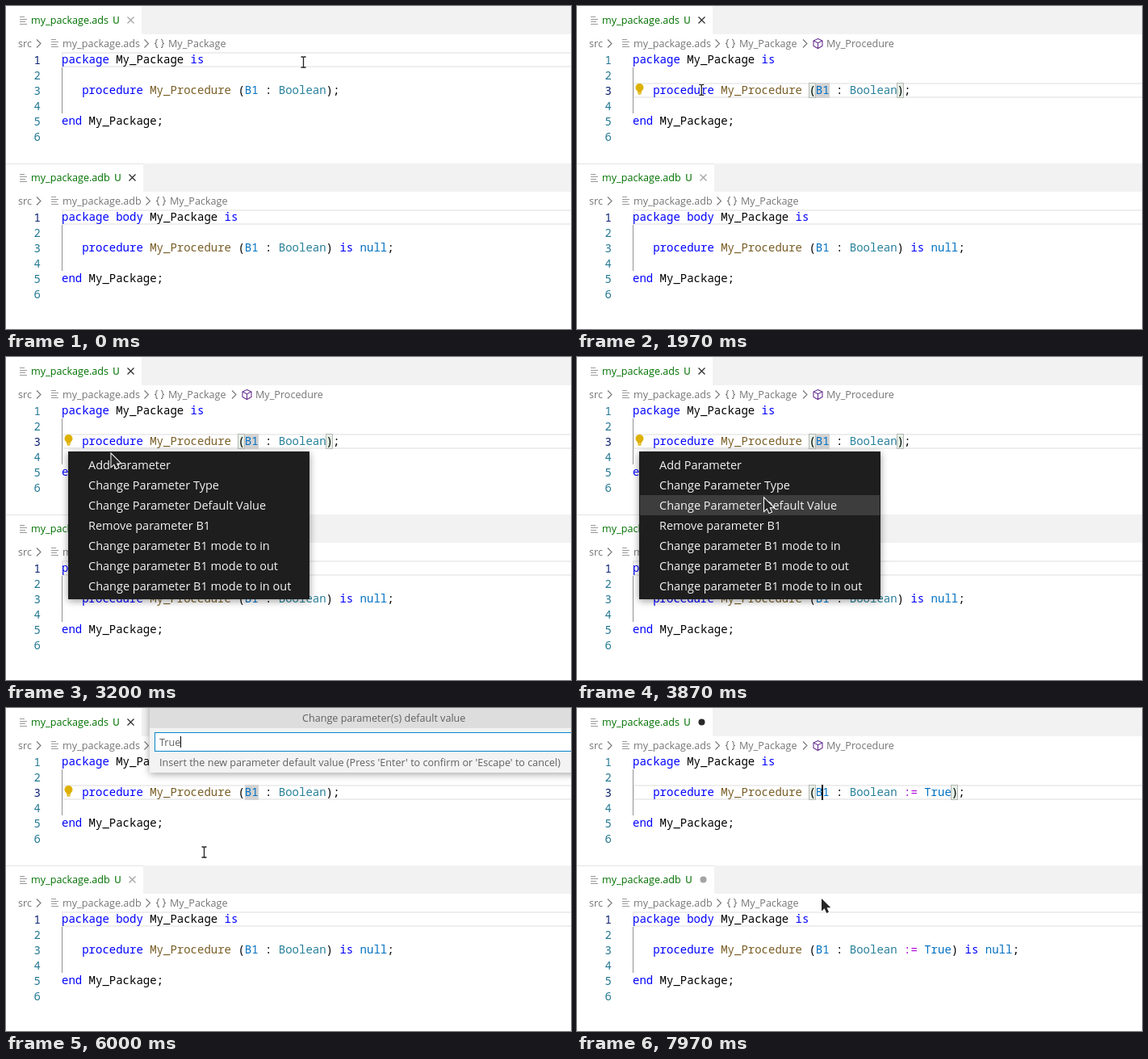
Animation of 700x400 px, one loop 8 s. Source, as an HTML page with a canvas:

```html
<!DOCTYPE html>
<html lang="en">
<head>
<meta charset="utf-8">
<style>
html, body { margin: 0; width: 100%; height: 100%; overflow: hidden; background: #fff; }
canvas { display: block; }
</style>
</head>
<body>
<canvas id="stage" width="700" height="400"></canvas>
<script>
const ctx = document.getElementById('stage').getContext('2d', { alpha: false });
const LOOP = 8000, CHAR = 8.4, ROW = 19, CODE_X = 69;
const UI = '"Open Sans", "Noto Sans", sans-serif';
const MONO = '14px "Noto Sans Mono", "DejaVu Sans Mono", monospace';
const GREY = '#767676', FAINT = '#a3a3a3';

const MENU = { x: 77, y: 117, w: 299, h: 183, top: 121.5, pitch: 25 };
const MENU_ITEMS = ['Add Parameter', 'Change Parameter Type', 'Change Parameter Default Value',
  'Remove parameter B1', 'Change parameter B1 mode to in', 'Change parameter B1 mode to out',
  'Change parameter B1 mode to in out'];

const ease = {
  both: u => u * u * (3 - 2 * u),
  in: u => u * u,
  out: u => u * (2 - u),
  line: u => u
};
// start, end, target x, target y, easing
const MOVES = [
  [400, 930, 304, 104, 'both'],
  [1570, 2230, 76, 103, 'both'],
  [2840, 3200, 130, 120, 'in'],
  [3200, 3630, 231, 175, 'out'],
  [3700, 3730, 232, 175, 'line'],
  [4300, 4470, 245, 178, 'both'],
  [7840, 7970, 303, 236, 'line']
];

function mouseAt(t) {
  let x = 368, y = 69;
  for (const [start, end, toX, toY, kind] of MOVES) {
    if (t < start) break;
    const u = ease[kind](Math.min(1, (t - start) / (end - start)));
    x += (toX - x) * u;
    y += (toY - y) * u;
  }
  return [x, y];
}

function rect(x, y, w, h, color) {
  ctx.fillStyle = color;
  ctx.fillRect(x, y, w, h);
}

function label(str, x, y, color, size = 12.6, weight = 400) {
  ctx.font = `${weight} ${size}px ${UI}`;
  ctx.fillStyle = color;
  ctx.fillText(str, x, y);
}

function path(d, x, y, stroke, width = 1, fill) {
  const p = new Path2D(d);
  ctx.save();
  ctx.translate(x, y);
  if (stroke) {
    ctx.strokeStyle = stroke;
    ctx.lineWidth = width;
    ctx.stroke(p);
  }
  if (fill) {
    ctx.fillStyle = fill;
    ctx.fill(p);
  }
  ctx.restore();
}

function disc(x, y, r, color) {
  ctx.fillStyle = color;
  ctx.beginPath();
  ctx.arc(x, y, r, 0, 7);
  ctx.fill();
}

function shadowed(x, y, w, h, color, alpha) {
  ctx.save();
  ctx.shadowColor = `rgba(0,0,0,${alpha})`;
  ctx.shadowBlur = 9;
  ctx.shadowOffsetY = 2;
  rect(x, y, w, h, color);
  ctx.restore();
}

const fileIcon = (x, y) => path('M0 .5H6M0 3.5H9M0 6.5H7M0 9.5H9', x, y, '#9a9a9a');
const chevron = (x, y) => path('M0 -5L5 0L0 5', x, y, GREY, 1.1);

function tokenColor(word, trueColor) {
  if (/^(package|body|is|procedure|end)$/.test(word)) return '#0000ff';
  if (word === 'My_Procedure') return '#795e26';
  if (word === 'Boolean') return '#267f99';
  if (word === 'True') return trueColor;
  if (/^(B1|null)$/.test(word)) return '#0070c1';
  return word === ':=' ? '#af00db' : '#000';
}

function codeLine(line, y, trueColor) {
  ctx.font = MONO;
  for (const { 0: word, index } of line.matchAll(/\w+|:=|[^\w\s]/g)) {
    ctx.fillStyle = tokenColor(word, trueColor);
    ctx.fillText(word, CODE_X + index * CHAR, y);
  }
}

function editor(top, o) {
  const dx = o.shift;
  // Tab strip
  rect(168 + dx, top, 532, 35, '#f2f2f2');
  fileIcon(17, top + 13);
  label(o.file, 31, top + 22, '#007100', 12.6);
  label('U', 132 + dx, top + 21.5, '#2c8a2c', 12, 600);
  const markColor = o.focused ? '#2a2a2a' : FAINT;
  if (o.dirty) disc(154.5 + dx, top + 17.5, 4, markColor);
  else path('M-4 -4L4 4M4 -4L-4 4', 154.5 + dx, top + 17.5, markColor, 1.2);

  // Breadcrumbs
  label('src', 15, top + 51, GREY);
  chevron(38, top + 46.5);
  fileIcon(56, top + 41);
  label(o.file, 70, top + 51, GREY);
  chevron(171.5 + dx, top + 46.5);
  const brace = 'M4 -5Q2 -5 2 -3V-1.5Q2 0 0 0Q2 0 2 1.5V3Q2 5 4 5';
  path(brace, 184 + dx, top + 46.5, GREY, 1.1);
  ctx.save();
  ctx.translate(196 + dx, top + 46.5);
  ctx.scale(-1, 1);
  path(brace, 0, 0, GREY, 1.1);
  ctx.restore();
  label('My_Package', 201 + dx, top + 51, GREY);
  if (o.inProcedure) {
    chevron(280, top + 46.5);
    path('M0 -6L5.5 -3.5V3L0 6L-5.5 3V-3.5ZM-5.5 -3.5L0 -.8L5.5 -3.5M0 -.8V6', 298.5, top + 46.5, '#652d90', 1.1);
    label('My_Procedure', 309, top + 51, GREY);
  }

  // Code area
  const rowTop = n => top + 57 + ROW * (n - 1);
  ctx.strokeStyle = '#eeeeee';
  ctx.lineWidth = 2;
  ctx.strokeRect(70, rowTop(o.current) + 1, 700, 17);
  rect(69, rowTop(2), 1, ROW * 3, '#939393');
  if (o.marked) rect(296, rowTop(3), 17, ROW, '#d3d3d3');
  if (o.brackets) {
    for (const col of [26, o.closeCol]) {
      const x = Math.floor(CODE_X + col * CHAR);
      rect(x, rowTop(3), 9, ROW, '#e5efe5');
      ctx.strokeStyle = '#b9b9b9';
      ctx.lineWidth = 1;
      ctx.strokeRect(x + .5, rowTop(3) + .5, 8, ROW - 1);
    }
  }
  const lines = [o.head, '', o.body, '', 'end My_Package;', ''];
  lines.forEach((line, i) => {
    codeLine(line, rowTop(i + 1) + 14, o.trueColor);
    ctx.font = MONO;
    ctx.fillStyle = i + 1 === o.current ? '#0b216f' : '#237893';
    ctx.fillText(i + 1, 34.5, rowTop(i + 1) + 15);
  });
  if (o.caret) rect(303, rowTop(3), 2, ROW, '#000');
}

function bulb() {
  disc(77.5, 101, 5, '#ddb100');
  rect(75, 104, 5, 3.5, '#ddb100');
  rect(75.5, 108, 4, 1.5, '#ddb100');
}

function menu(ready, mx, my) {
  shadowed(MENU.x, MENU.y, MENU.w, MENU.h, ready ? '#1e1e1e' : '#2c2c2c', .4);
  if (!ready) return;
  const hover = mx > MENU.x ? Math.floor((my - MENU.top) / MENU.pitch) : -1;
  MENU_ITEMS.forEach((item, i) => {
    const y = MENU.top + i * MENU.pitch;
    if (i === hover) rect(MENU.x + 1, Math.floor(y), MENU.w - 2, MENU.pitch, '#3d3d3e');
    label(item, 102, y + 17.5, '#f4f4f4', 14.5);
  });
}

function inputBox(typed) {
  shadowed(178, -10, 582, 90, '#f3f3f3', .35);
  rect(178, 0, 522, 25, '#dddddd');
  label('Change parameter(s) default value', 367, 17, '#616161');
  rect(184, 30, 570, 24, '#0a84c8');
  rect(185, 31, 568, 22, '#fff');
  label(typed, 190, 47, '#616161');
  rect(Math.round(190 + ctx.measureText(typed).width), 35, 1, 14, '#000');
  label("Insert the new parameter default value (Press 'Enter' to confirm or 'Escape' to cancel)", 190, 72, '#616161');
}

function pointer(x, y, arrow) {
  if (arrow) {
    path('M0 0V15.5L3.6 12.2L6.2 18L9 16.8L6.5 11.2H11.3Z', x, y, '#fff', 2, '#262626');
  } else {
    const beam = 'M-3 -6.5H-1Q0 -6.5 0 -5.5Q0 -6.5 1 -6.5H3M0 -5.5V5.5M-3 6.5H-1Q0 6.5 0 5.5Q0 6.5 1 6.5H3';
    path(beam, x + .5, y + .5, '#fff', 3);
    path(beam, x + .5, y + .5, '#222', 1.3);
  }
}

function draw(t) {
  const within = (a, b) => t >= a && t < b;
  const blink = from => (t - from) % 1000 < 500;
  const [mx, my] = mouseAt(t);
  const clicked = t >= 1130, edited = t >= 6960;
  const value = edited ? ' := True' : '';
  const trueColor = t >= 7230 ? '#0070c1' : '#267f99';
  const signature = `   procedure My_Procedure (B1 : Boolean${value})`;

  rect(0, 0, 700, 400, '#fff');
  editor(0, {
    file: 'my_package.ads', shift: 0, focused: clicked, dirty: edited, trueColor,
    head: 'package My_Package is', body: signature + ';',
    current: clicked ? 3 : 1, inProcedure: t >= 1200,
    marked: within(1330, 6930), brackets: within(1200, 4130) || edited,
    closeCol: signature.length - 1,
    caret: within(1130, 2370) && blink(1130) || t >= 6930 && blink(6930)
  });
  rect(0, 195, 700, 1, '#e4e4e4');
  editor(195, {
    file: 'my_package.adb', shift: 2, focused: !clicked, dirty: t >= 7000, trueColor,
    head: 'package body My_Package is', body: signature + ' is null;', current: 1
  });

  if (within(1400, 6930)) bulb();
  if (within(2370, 4130)) menu(t >= 2400, mx, my);
  if (within(4230, 6930)) {
    const typed = [5470, 5730, 5900, 6000].filter(at => t >= at).length;
    inputBox('True'.slice(0, typed));
  }
  pointer(mx, my, within(1600, 4200) && mx < 86 || within(2370, 4200) || my > 195);
}

function tick() {
  draw(performance.now() % LOOP);
  requestAnimationFrame(tick);
}
tick();
</script>
</body>
</html>
```
